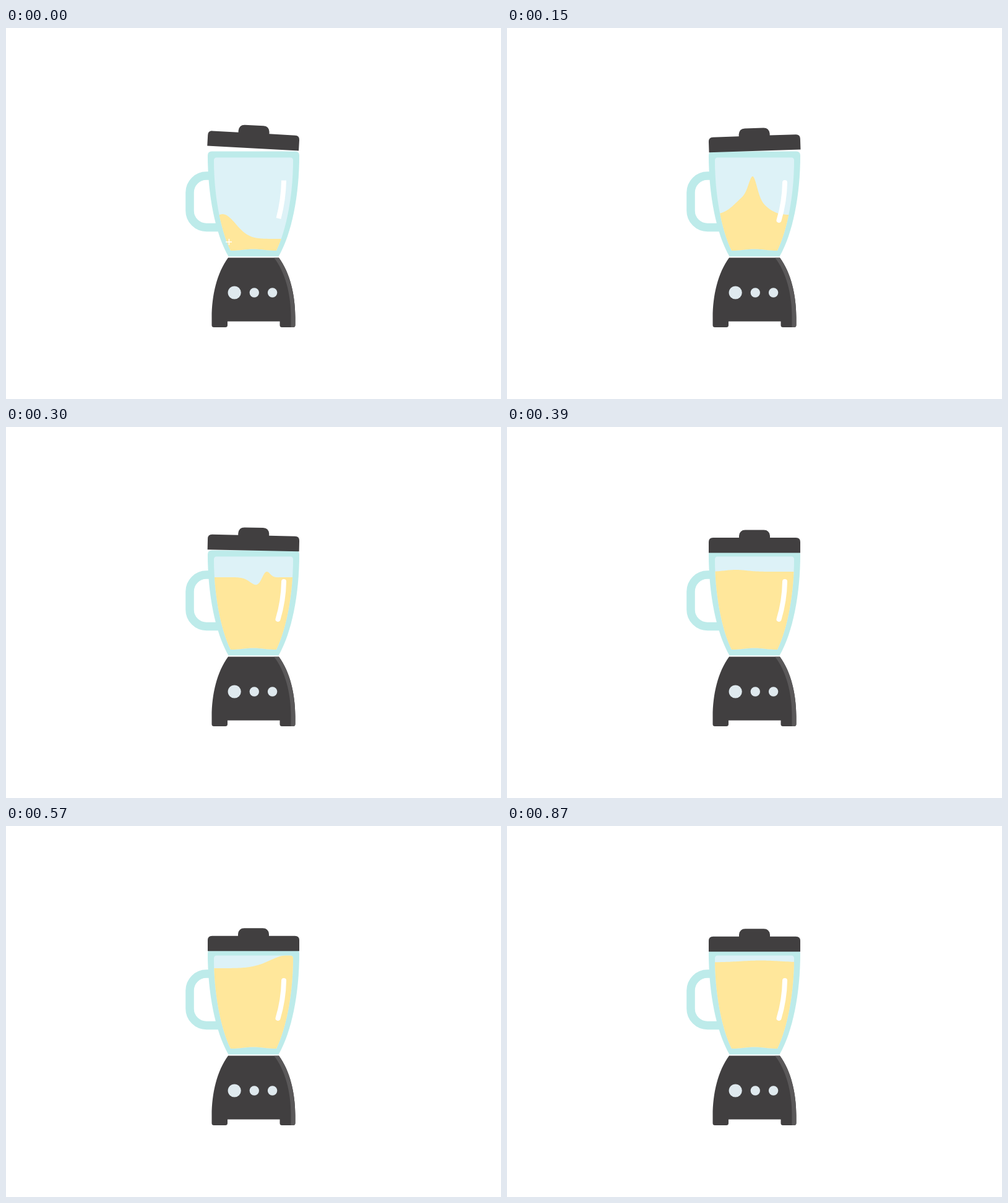
These frames come from a looping animation (800x600 px, 0.9 s). An HTML page with a canvas:

```html
<!DOCTYPE html>
<html lang="en">
<head>
<meta charset="utf-8">
<title>Blender</title>
<style>
  html, body { margin: 0; width: 100%; height: 100%; overflow: hidden; background: #fff; }
  canvas { display: block; }
</style>
</head>
<body>
<canvas id="stage" width="800" height="600"></canvas>
<script>
const ctx = document.getElementById('stage').getContext('2d');
const LOOP = 900, STEP = 30, SETTLED = 390;
const DARK = '#413f40', SHADE = '#5a5859', JAR = '#bdebea', GLASS = '#ddf2f7',
      LIQUID = '#ffe79b', BUTTON = '#dfe9ee';

const jarPath = new Path2D(`M326 206 Q326 199.5 332.5 199.5 H467.5 Q474 199.5 474 206
  C474 270 462 332 440.5 369.5 H359.5 C338 332 326 270 326 206Z`);
const glassPath = new Path2D(`M336 214 Q336 209.5 340.5 209.5 H459.5 Q464 209.5 464 214
  C464 268 454 325 437 360 C420 360 414 357.5 400 357.5
  C386 357.5 380 360 363 360 C346 325 336 268 336 214Z`);
const handlePath = new Path2D(`M334 239 H324 A27 27 0 0 0 297 266 V295.5
  A27 27 0 0 0 324 322.5 H346`);
const basePath = new Path2D(`M359 371.5 H441 C459 396 467.5 432 467.5 468 V480.5
  Q467.5 484 464 484 H446 Q442.5 484 442.5 480.5 V474.5 H358 V480.5
  Q358 484 354.5 484 H336 Q332.5 484 332.5 480.5 V468
  C332.5 432 341 396 359 371.5Z`);
const innerBase = new Path2D('M433 371.5 C451 394 460.5 430 460.5 466 V484 H480 V371.5Z');
const lidPath = new Path2D(`M326 203.5 V186 Q326 179 333 179 H375 V176
  Q376 166.5 385 166.5 H415 Q424 166.5 425 176 V179 H467 Q474 179 474 186 V203.5Z`);

// Lid rattle: time, tilt in degrees, lift
const lidPoses = [[0, 3.1, 9], [90, -3.9, 4], [240, 1.9, 5.7], [SETTLED, 0, 0]];

// Liquid: time, level, swell height, swell x, swell width, crest height, crest x
const liquidPoses = [
  [0, 341, 40, 350, 30, 0, 375],
  [90, 338, 71, 365, 42, 34, 387],
  [240, 249, -24, 431, 11, 26, 413],
  [SETTLED, 234, 3, 370, 25, 0, 430],
  [570, 230, 21, 455, 40, 0, 430],
  [720, 228, 16, 365, 25, 0, 430],
  [870, 220.5, 3, 410, 45, 0, 430]
];

const linear = k => k;
const smooth = k => (1 - Math.cos(Math.PI * k)) / 2;
const hump = (x, center, width) => Math.exp(-(((x - center) / width) ** 2));

function poseAt(poses, t, ease) {
  let i = 0;
  while (i < poses.length - 2 && t >= poses[i + 1][0]) i++;
  const from = poses[i], to = poses[i + 1];
  const k = ease(Math.min(1, (t - from[0]) / (to[0] - from[0])));
  return from.slice(1).map((v, j) => v + (to[j + 1] - v) * k);
}

function fill(path, color) {
  ctx.fillStyle = color;
  ctx.fill(path);
}

function stroke(path, color, width, cap = 'butt') {
  ctx.strokeStyle = color;
  ctx.lineWidth = width;
  ctx.lineCap = cap;
  ctx.stroke(path);
}

function fillClipped(clip, path, color) {
  ctx.save();
  ctx.clip(clip);
  fill(path, color);
  ctx.restore();
}

function drawLiquid(t) {
  const [level, swell, swellX, swellWidth, crest, crestX] = poseAt(liquidPoses, t, linear);
  const surface = new Path2D();
  surface.moveTo(330, 370);
  for (let x = 330; x <= 470; x += 2) {
    surface.lineTo(x, level - swell * hump(x, swellX, swellWidth) - crest * hump(x, crestX, 9));
  }
  surface.lineTo(470, 370);
  fillClipped(glassPath, surface, LIQUID);
}

function drawShine(t) {
  if (t < STEP) {
    stroke(new Path2D('M449 246.5 Q448.5 277 440.5 308'), '#fff', 8);
    stroke(new Path2D('M355 346 H365 M360.5 341 V351'), '#fff', 1.5);
  } else {
    stroke(new Path2D('M449 250 Q448.5 281 439.5 311'), '#fff', 8, 'round');
  }
}

function drawLid(t) {
  const [tilt, lift] = poseAt(lidPoses, t, smooth);
  const hover = t > SETTLED ? 1.3 * Math.sin(Math.PI * (t - SETTLED) / 500) : 0;
  ctx.save();
  ctx.translate(400, 188 - lift - hover);
  ctx.rotate(tilt * Math.PI / 180);
  ctx.translate(-400, -188);
  fill(lidPath, DARK);
  ctx.restore();
}

function drawBase() {
  fill(basePath, DARK);
  fillClipped(basePath, innerBase, SHADE);
  for (const [x, r] of [[369.2, 10.6], [401.3, 7.7], [430.6, 7.7]]) {
    const dot = new Path2D();
    dot.arc(x, 428, r, 0, Math.PI * 2);
    fill(dot, BUTTON);
  }
}

function draw(t) {
  ctx.fillStyle = '#fff';
  ctx.fillRect(0, 0, 800, 600);
  stroke(handlePath, JAR, 13.5);
  fill(jarPath, JAR);
  fill(glassPath, GLASS);
  drawLiquid(t);
  drawShine(t);
  drawBase();
  drawLid(t);
}

const start = performance.now();
function tick() {
  const t = (performance.now() - start) % LOOP;
  draw(Math.floor(t / STEP) * STEP);
  requestAnimationFrame(tick);
}
tick();
</script>
</body>
</html>
```
